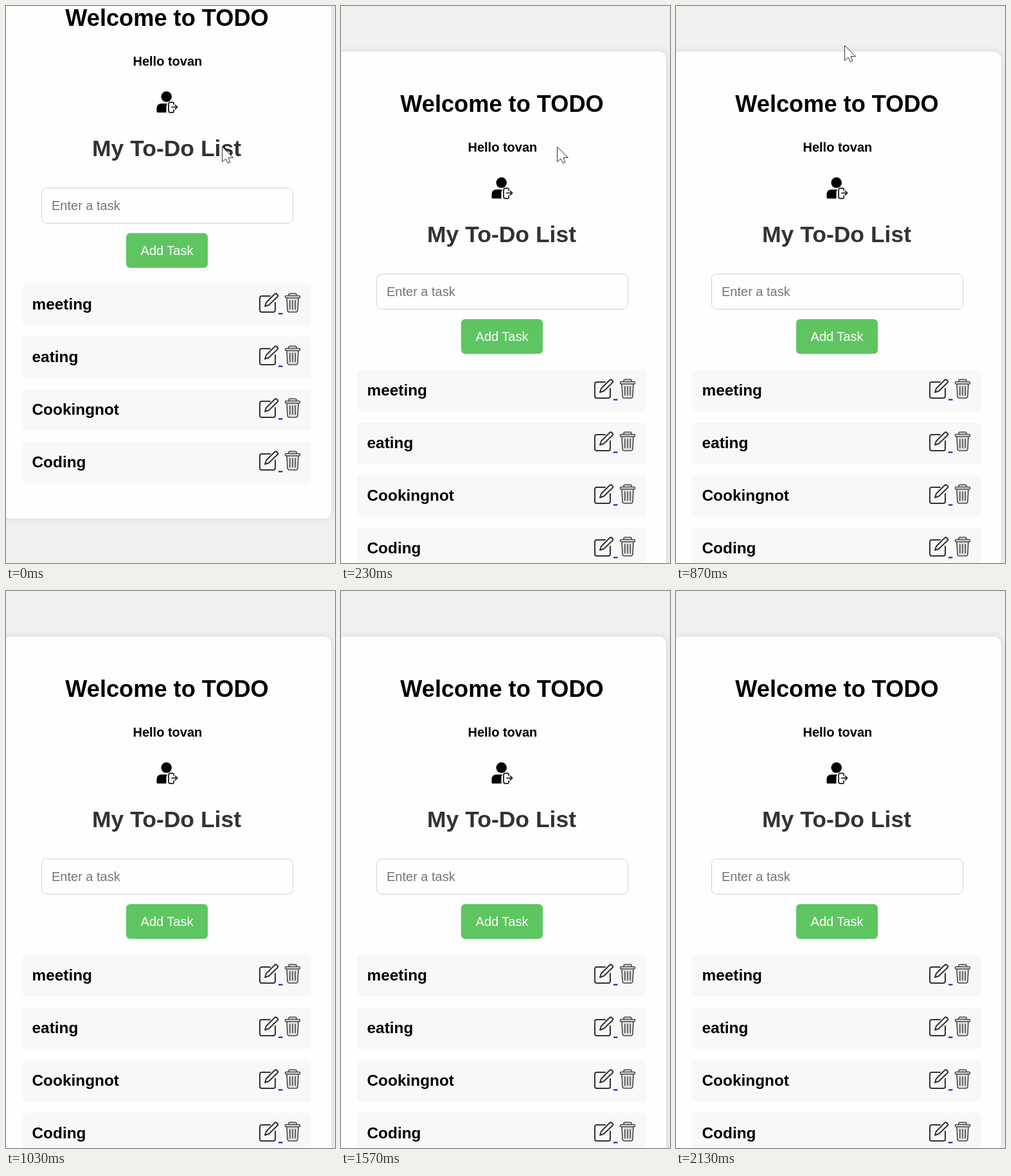
An HTML page for the animation above (2.16 s loop, 512 by 868 pixels).

```html
<!DOCTYPE html>
<html lang="en">
<head>
<meta charset="utf-8">
<title>To-do list</title>
<style>
  html, body { margin: 0; width: 100%; height: 100%; overflow: hidden; background: #f0f0f0; }
  svg { display: block; width: 512px; height: 868px; font: 20px "Liberation Sans", Arial, sans-serif; }
  .card { fill: #fefefe; filter: drop-shadow(0 0 6px rgba(0, 0, 0, .1)); }
  .mid { text-anchor: middle; }
  .bold { font-weight: bold; }
  .title { font-size: 36.2px; font-weight: bold; }
  .list-title { font-size: 35.5px; font-weight: bold; fill: #333; }
  .task { font-size: 24.4px; font-weight: bold; }
  .icon { fill: none; stroke: #333; stroke-width: 2; stroke-linecap: round; stroke-linejoin: round; }
  .bin { fill: #e0e0e0; stroke: #4a4a4a; stroke-width: 1.6; }
</style>
</head>
<body>
<svg viewBox="0 0 512 868">
  <defs>
    <g id="tools">
      <g class="icon">
        <path d="M411 452H398Q395 452 395 455V474Q395 477 398 477H416Q419 477 419 474V462"/>
        <path d="M403 468L405 462L418.500 448.500Q420 447.500 421.500 449L422.500 450Q424 451.500 422.500 453L409 466Z"/>
      </g>
      <g class="icon bin">
        <path d="M440 452V450Q440 448 442 448H450Q452 448 452 450V452"/>
        <path d="M437 455L438 474Q438.300 477 441 477H451Q453.700 477 454 474L455 455"/>
        <rect x="434.500" y="451.500" width="23" height="3.500" rx="1.500"/>
        <path d="M441.800 459V472.500M446 459V472.500M450.200 459V472.500"/>
      </g>
      <path d="M424 479.500H430.500" stroke="#1a0f8a" stroke-width="2"/>
    </g>
  </defs>
  <g id="page">
    <rect class="card" x="-5" y="-63" width="511" height="862" rx="12"/>
    <text class="mid title" x="250.500" y="31">Welcome to TODO</text>
    <text class="bold" x="197.500" y="93">Hello tovan</text>
    <circle cx="249.700" cy="141.300" r="8.300"/>
    <path d="M234.500 165V159Q235 152 242 152H251Q249.500 154 249.500 158V166H236Q234.500 166 234.500 165Z"/>
    <path class="icon" d="M261 153V151.500Q261 150 259 150H256Q253 150 253 153V163Q253 166 256 166H259Q261 166 261 164.500V162M258 157.500H266.500M263.500 154.500L266.500 157.500L263.500 160.500"/>
    <text class="mid list-title" x="250" y="234">My To-Do List</text>
    <rect x="55.500" y="283.500" width="391" height="55" rx="8" fill="#fefefe" stroke="#d0d0d0"/>
    <text x="71" y="318" fill="#757575">Enter a task</text>
    <rect x="187" y="354" width="127" height="54" rx="6" fill="#5ec561"/>
    <text class="mid" x="250.500" y="388" fill="#fff">Add Task</text>
    <g id="list"></g>
  </g>
  <path id="cursor" d="M.5 .5V24L6 19L9.500 26L13 24.500L10 17.500H17.500Z" fill="#fff" stroke="#333"/>
</svg>
<script>
  const get = id => document.getElementById(id);
  const LOOP = 2160, SCROLL_AT = 230, SCROLL = 134;

  get('list').innerHTML = ['meeting', 'eating', 'Cookingnot', 'Coding'].map((task, i) => `
    <g transform="translate(0 ${i * 82})">
      <rect x="25" y="433" width="450" height="65" rx="6" fill="#f8f8f9"/>
      <text class="task" x="40.500" y="473">${task}</text>
      <use href="#tools"/>
    </g>`).join('');

  const move = (id, x, y) => get(id).setAttribute('transform', `translate(${x} ${y})`);

  function draw(now) {
    const t = now % LOOP;
    move('page', 0, t < SCROLL_AT ? 0 : SCROLL);
    // the pointer speeds up and leaves over the top edge
    const p = Math.max(0, (t - 450) / 420) ** 1.4;
    move('cursor', Math.round(336 - 74 * p), Math.round(219 - 157 * p));
    requestAnimationFrame(draw);
  }
  draw(0);
</script>
</body>
</html>
```
